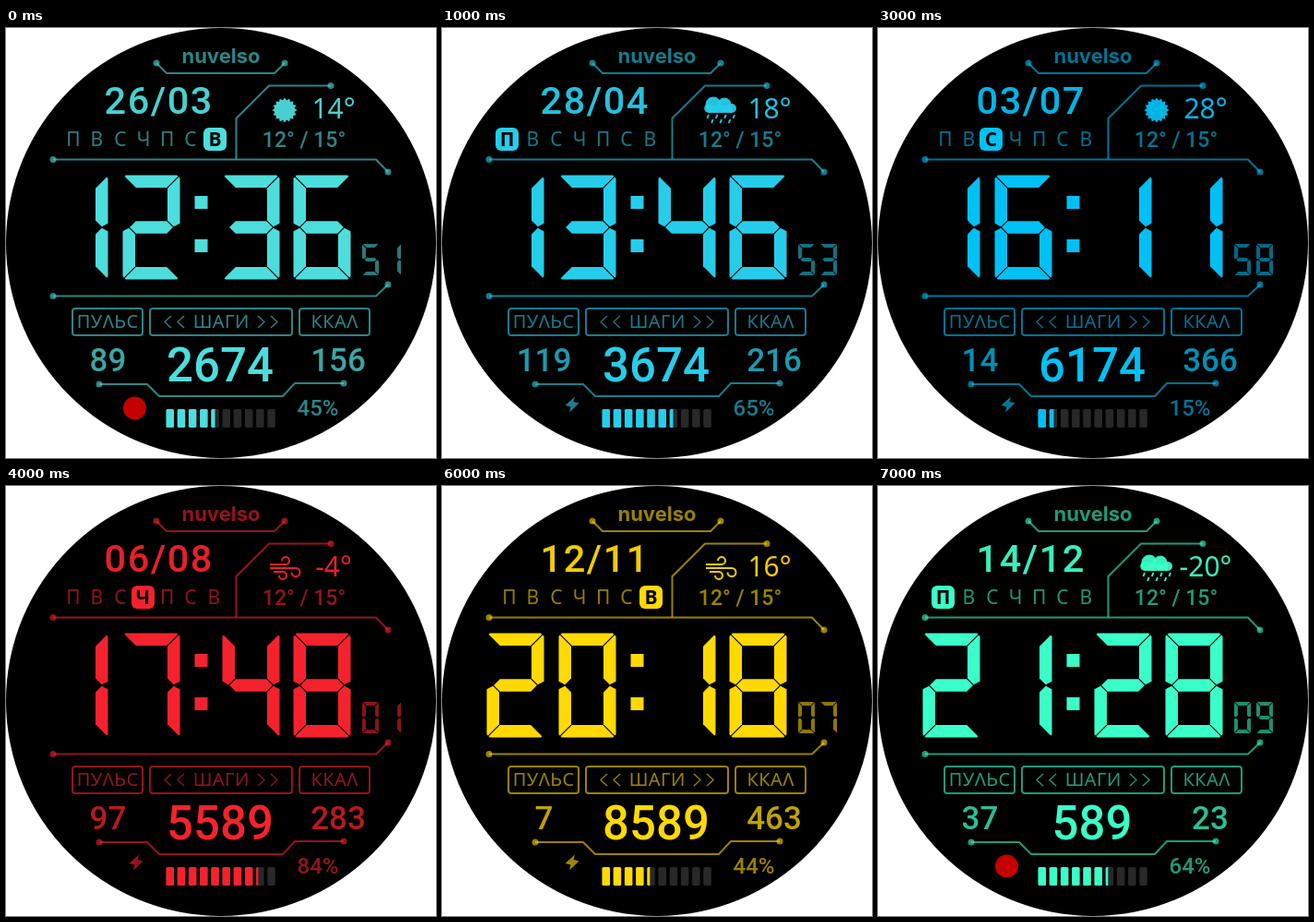
Animation of 466 by 466 pixels, one loop 8000 ms. Source, as an HTML page with a canvas:

```html
<!DOCTYPE html>
<html lang="ru">
<head>
<meta charset="utf-8">
<title>Watch face</title>
<style>
html, body { margin: 0; width: 100%; height: 100%; overflow: hidden; background: #fff; }
canvas { display: block; width: 466px; height: 466px; }
</style>
</head>
<body>
<canvas id="face" width="466" height="466"></canvas>
<script>
const ctx = document.getElementById('face').getContext('2d');
const TAU = Math.PI * 2;
const STEP = 1000;

// Starting readings of the two demo runs; readings() advances them
const spring = { day: 26, month: 3, weekday: 6, hour: 12, minute: 36, second: 51, temp: 14, warming: 2, pulse: 89, steps: 2674, kcal: 156, battery: 45 };
const autumn = { day: 6, month: 8, weekday: 3, hour: 17, minute: 48, second: 1, temp: -4, warming: 14, pulse: 97, steps: 5589, kcal: 283, battery: 84 };

const scenes = [
  { run: spring, ticks: 0, color: '#4ddddd', icon: 'sun', alert: true },
  { run: spring, ticks: 2, color: '#26cdea', icon: 'rain' },
  { run: spring, ticks: 5, color: '#00c0f5', icon: 'snow' },
  { run: spring, ticks: 7, color: '#00c0f5', icon: 'sun' },
  { run: autumn, ticks: 0, color: '#f5222d', icon: 'wind' },
  { run: autumn, ticks: 4, color: '#ff7f00', icon: 'storm' },
  { run: autumn, ticks: 6, color: '#ffd900', icon: 'wind' },
  { run: autumn, ticks: 8, color: '#3affc8', icon: 'rain', alert: true }
];

const pad = n => String(n).padStart(2, '0');

function wrap(value, low, high) {
  const span = high - low;
  return low + ((value - low) % span + span) % span;
}

function readings({ run, ticks }) {
  const half = Math.ceil(ticks / 2);
  return {
    date: pad(wrap(run.day + ticks, 1, 31)) + '/' + pad(wrap(run.month + half, 1, 13)),
    weekday: wrap(run.weekday + Math.floor(ticks / 2), 0, 7),
    time: pad(wrap(run.hour + half, 0, 24)) + pad(wrap(run.minute + 5 * ticks, 0, 60)),
    second: pad(wrap(run.second + ticks, 0, 60)),
    temp: wrap(run.temp + run.warming * ticks, -20, 44) + '°',
    pulse: wrap(run.pulse + 15 * ticks, 0, 180),
    steps: wrap(run.steps + 500 * ticks, 0, 9000),
    kcal: wrap(run.kcal + 30 * ticks, 0, 500),
    battery: wrap(run.battery + 10 * ticks, 0, 100)
  };
}

function use(color, alpha = 1) {
  ctx.fillStyle = ctx.strokeStyle = color;
  ctx.globalAlpha = alpha;
}

function trace(points) {
  ctx.beginPath();
  points.forEach(([x, y]) => ctx.lineTo(x, y));
}

function line(points, width = 2) {
  trace(points);
  ctx.lineWidth = width;
  ctx.stroke();
}

function poly(points) {
  trace(points);
  ctx.fill();
}

function disc(x, y, r) {
  ctx.beginPath();
  ctx.arc(x, y, r, 0, TAU);
  ctx.fill();
}

function box(x, y, w, h, r) {
  ctx.beginPath();
  ctx.roundRect(x, y, w, h, r);
}

function text(value, x, y, font, spacing = 0) {
  ctx.font = font;
  ctx.letterSpacing = spacing + 'px';
  ctx.fillText(value, x + spacing / 2, y);
}

const roboto = size => `500 ${size}px Roboto, sans-serif`;
const sans = (size, weight = 500) => `${weight} ${size}px "Noto Sans", "Open Sans", sans-serif`;

// Lit segments per digit: a top, b/c right, d bottom, e/f left, g middle
const lit = ['abcdef', 'bc', 'abged', 'abgcd', 'fgbc', 'afgcd', 'afgedc', 'abc', 'abcdefg', 'abcdfg'];

function digit(n, x, y, w, h, t, gap) {
  const m = h / 2, k = t / 2, cut = t / 4;
  const near = (cut - gap) / 2, far = (cut + gap) / 2;
  const flipX = p => p.map(([a, b]) => [w - a, b]);
  const flipY = p => p.map(([a, b]) => [a, h - b]);
  const topLeft = [[t + gap, t], [far, near], [cut, 0]];
  const top = [...topLeft, ...flipX(topLeft).reverse()];
  const side = [[0, cut], [near, far], [t, t + gap], [t, m - k - gap], [k, m - gap], [0, m - gap - k / 2]];
  const tip = [[t + gap, m + k], [k + gap, m], [t + gap, m - k]];
  const shapes = {
    a: top, d: flipY(top),
    f: side, b: flipX(side), e: flipY(side), c: flipX(flipY(side)),
    g: [...tip, ...flipX(tip).reverse()]
  };
  for (const s of lit[n]) poly(shapes[s].map(([a, b]) => [x + a, y + b]));
}

function cloud() {
  disc(294, 83, 8.5);
  disc(306, 83, 7.5);
  disc(289, 87, 4.8);
  disc(314, 87, 5);
  ctx.fillRect(289, 84, 25, 8);
}

function drops(count) {
  for (let i = 0; i < count; i++) {
    const x = 289 + 28 * i / (count - 1), y = 94 + i % 2 * 5;
    line([[x, y], [x - 1.5, y + 4]]);
  }
}

// A breeze line that ends in a three-quarter turn; turn is -1 up, 1 down
function breeze(x0, y, x1, r, turn) {
  ctx.beginPath();
  ctx.moveTo(x0, y);
  ctx.arc(x1, y + turn * r, r, -turn * Math.PI / 2, Math.PI, turn < 0);
  ctx.stroke();
}

const icons = {
  sun() {
    const teeth = 16;
    poly(Array.from({ length: teeth * 2 }, (_, i) => {
      const r = i % 2 ? 10.8 : 13.5, a = i * Math.PI / teeth;
      return [302 + r * Math.cos(a), 89 + r * Math.sin(a)];
    }));
  },
  snow() {
    cloud();
    for (const [x, y] of [[290, 95], [309, 95], [298, 101]])
      for (let a = 0; a < Math.PI; a += Math.PI / 3) {
        const dx = 3.2 * Math.cos(a), dy = 3.2 * Math.sin(a);
        line([[x - dx, y - dy], [x + dx, y + dy]], 1.2);
      }
  },
  rain() {
    cloud();
    drops(7);
  },
  storm() {
    cloud();
    drops(6);
    poly([[304, 90], [299, 97], [303, 97], [300, 104], [308, 95], [304, 95]]);
  },
  wind() {
    ctx.lineWidth = 2;
    breeze(286, 85, 303, 4, -1);
    breeze(286, 89, 314, 4.5, 1);
    breeze(290, 93, 300, 4, 1);
  }
};

function drawFrame() {
  const paths = [
    [[163, 38], [174, 49], [291, 49], [302, 38]],
    [[51, 142.5], [401, 142.5], [414, 156]],
    [[51, 290.5], [401, 290.5], [414, 278]],
    [[101, 386], [153, 386], [166, 399], [300, 399], [313, 385], [366, 385]]
  ];
  for (const p of paths) {
    line(p);
    disc(...p[0], 3.5);
    disc(...p[p.length - 1], 3.5);
  }
  line([[249.5, 142], [249.5, 98], [285, 62.5], [352, 62.5]]);
  disc(352, 62.5, 3.5);

  for (const [x, w, label] of [[72, 76, 'ПУΛЬС'], [156, 154, 'ШАГИ'], [318, 76, 'ККАΛ']]) {
    box(x, 304, w, 29, 3);
    ctx.stroke();
    text(label, x + w / 2, 325, sans(20), .4);
  }
  for (const side of [-1, 1])
    for (const offset of [40, 54]) {
      const x = 233 + side * offset;
      line([[x, 312], [x + side * 7, 318.5], [x, 325]], 1.3);
    }
}

function drawDays(weekday, color) {
  [...'ПВСЧПСВ'].forEach((name, i) => {
    const x = 70.5 + 26 * i;
    if (i === weekday) {
      use(color);
      box(x - 12.5, 108, 25, 25, 6);
      ctx.fill();
      use('#000');
      text(name, x, 128, sans(21, 700));
    } else {
      use(color, .58);
      text(name, 73 + 25.4 * i, 128, sans(21));
    }
  });
}

function drawBattery(level, color) {
  const bars = () => {
    for (let i = 0; i < 10; i++) {
      box(173.5 + 12.2 * i, 413, 8.5, 20, 1.5);
      ctx.fill();
    }
  };
  use('#282828');
  bars();
  ctx.save();
  ctx.beginPath();
  ctx.rect(172.5, 410, 1.2 * level, 26);
  ctx.clip();
  use(color);
  bars();
  ctx.restore();
}

function draw(scene) {
  const { color } = scene;
  const now = readings(scene);
  use('#fff');
  ctx.fillRect(0, 0, 466, 466);
  use('#000');
  disc(233, 233, 233);
  ctx.textAlign = 'center';

  use(color, .6);
  drawFrame();
  text('nuvelso', 233, 38, '700 22px Inter, sans-serif');
  text('12° / 15°', 323, 129, roboto(23));
  text(now.battery + '%', 338, 420, roboto(24));

  use(color, .94);
  text(now.date, 165, 92.5, roboto(41.5), 1.5);
  text(now.temp, 355, 97.5, sans(30, 400));
  icons[scene.icon]();
  drawDays(now.weekday, color);

  use(color);
  [48, 126, 234, 311].forEach((x, i) => digit(now.time[i], x + .5, 159.5, 62, 113, 13.5, .8));
  for (const y of [182, 229]) ctx.fillRect(204.5, y, 14, 14);
  text(now.steps, 232, 382.5, roboto(51));

  use(color, .55);
  [386, 410].forEach((x, i) => digit(now.second[i], x, 234, 18, 34, 4, .5));

  use(color, .75);
  text(now.pulse, 110.5, 372, roboto(35));
  text(now.kcal, 360, 372, roboto(35));
  drawBattery(now.battery, color);

  if (scene.alert) {
    use('#c40000');
    disc(139.5, 412, 12.5);
  } else {
    use(color, .62);
    poly([[144, 399.5], [133.5, 409], [139.5, 410.5], [138, 416.5], [148.5, 406.5], [142.5, 405]]);
  }
}

function tick() {
  const t = performance.now() % (scenes.length * STEP);
  draw(scenes[Math.floor(t / STEP)]);
  requestAnimationFrame(tick);
}
tick();
</script>
</body>
</html>
```
